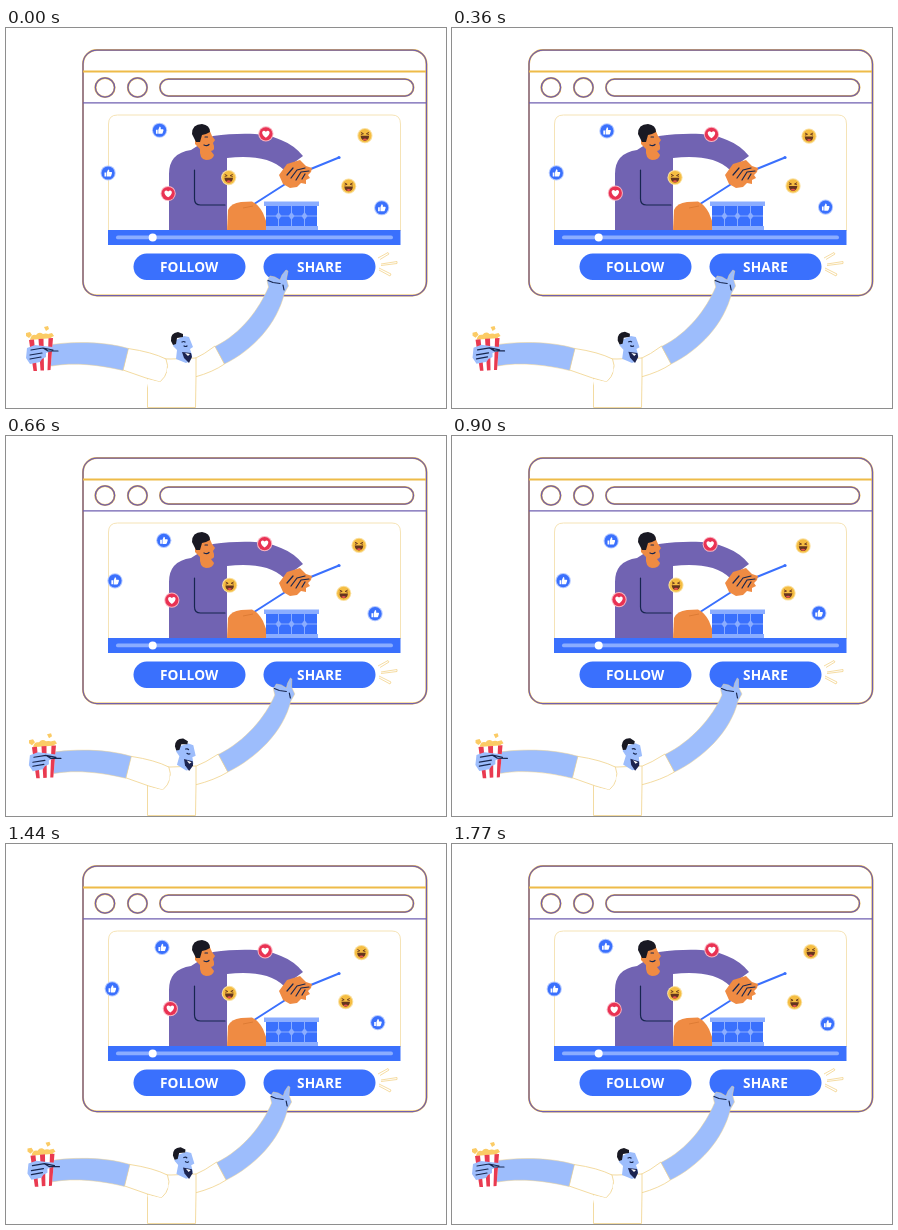
An HTML page that plays this animation: 440 px wide and 380 px high, repeating every 1800 ms.

```html
<!DOCTYPE html>
<html lang="en">
<head>
<meta charset="utf-8">
<title>Live video reactions</title>
<style>
  html, body { margin: 0; width: 100%; height: 100%; overflow: hidden; background: #fff; }
  svg { display: block; width: 440px; height: 380px; }
  text { font: 700 13.7px "Noto Sans", "Open Sans", sans-serif; fill: #fff; text-anchor: middle; letter-spacing: .15px; }
  .gold { fill: none; stroke: #eebb48; stroke-width: 2; }
  .violet { fill: none; stroke: #6f5fb0; stroke-width: 1.25; }
  .blue { fill: #3a70fd; }
  .pale { fill: #8badff; }
  .orange { fill: #ef8b43; }
  .purple { fill: #7163b2; }
  .skin { fill: #9dbdfc; stroke: #f2d58f; stroke-width: .5; }
  .cloth { fill: #fff; stroke: #f0d28a; stroke-width: .8; }
  .ink { fill: none; stroke: #17264f; stroke-width: 1.2; stroke-linecap: round; stroke-linejoin: round; }
  .dark { fill: #191923; }
  .corn { fill: #fbcb65; }
</style>
</head>
<body>
<svg viewBox="0 0 440 380">
  <defs>
    <g id="frame">
      <rect x="77" y="22" width="343.5" height="245.5" rx="14"/>
      <circle cx="99" cy="59.5" r="9.6"/>
      <circle cx="131.5" cy="59.5" r="9.6"/>
      <rect x="154" y="51" width="253.5" height="17" rx="8.5"/>
    </g>
    <g id="like">
      <circle r="7.6" fill="#b3c8ff"/><circle r="6.6" class="blue"/>
      <path d="M-3.6-.5h1.7v4h-1.7zM-1.3-.5 0-3.6q1.6-.2 1.2 2.6h2.2q.8.2.5 1.2L3 3q-.3.6-1 .6h-3.3z" fill="#fff"/>
    </g>
    <g id="heart">
      <circle r="7.6" fill="#f8b3c0"/><circle r="6.6" fill="#e93253"/>
      <path d="M0 3.8C-6.4-.3-3.2-5.2 0-2.1 3.2-5.2 6.4-.3 0 3.8z" fill="#fff"/>
    </g>
    <g id="laugh">
      <circle r="7.6" fill="#fae0a0"/><circle r="6.6" fill="#f5bd42"/>
      <path d="M-4.3.2H4.3Q3.8 5 0 5T-4.3.2z" fill="#65351f"/>
      <path d="M-2.4 3.8Q0 1.7 2.4 3.8 0 5.8-2.4 3.8z" fill="#e8524d"/>
      <path d="M-4-3.2l2.5 1.3-2.5.8M4-3.2 1.5-1.9 4-1.1" fill="none" stroke="#65351f" stroke-width=".9"/>
    </g>
  </defs>

  <use href="#frame" class="gold"/>
  <use href="#frame" class="violet"/>
  <path d="M77 43.5H420" class="gold"/>
  <path d="M77 74.8H420" class="violet"/>

  <path d="M102.5 203V96q0-9 9-9H386q8.500 0 8.500 9V203" fill="#fff" stroke="#f3dca4" stroke-width=".8"/>

  <!-- Drummer -->
  <path class="purple" d="M163 202V146Q163 125 185 122L207 108C232 105 258 104 275 112Q288 117 297 128L278 142C267 130 244 127 221 130V202z"/>
  <path class="ink" d="M188.500 142V171q0 6 6 6H219"/>
  <path class="orange" d="M189 108 203 101 206 108 209 112 207 115Q210 122 205 123L208 127Q207 132 200 132 193 131 194 121L189 116z"/>
  <path class="dark" d="M186 106Q186 96 196 96 204 97 204 104L200 106 196 107 194 114 190 114z"/>
  <path class="ink" d="M198 117q3 1.500 5-.5M199 109h2.500" stroke-width=".8"/>
  <path d="M245 178 284 153M290 147 333 129.500" fill="none" stroke="#3a70fd" stroke-width="2"/>
  <circle cx="333" cy="129.500" r="1.600" class="blue"/>
  <path class="orange" d="M273 147 281 136 294 132 300 138 306 140 305 144 302 147 304 150 300 152 300 156 295 155 291 159 284 160 277 156z"/>
  <path class="ink" d="M281 147 287 140M285 150 291 142 299 140M290 152 295 144 303 143M296 151 299 146"/>
  <path class="orange" d="M221 202 222 182Q225 175 235 174L246 173.500Q253 177 257 185L262 198V202z"/>
  <path d="M237 180 247 178" stroke="#d97832" stroke-width=".8"/>
  <path class="pale" d="M258 173.500h55v4.500h-55zM260 198h52v4h-52z"/>
  <path class="blue" d="M260 178h51v20h-51z"/>
  <path d="M260 188H311M272.500 178V198M285.500 178V198M298.500 178V198" fill="none" stroke="#8badff"/>
  <path class="pale" d="M272.500 184l3 4-3 4-3-4zM285.500 184l3 4-3 4-3-4zM298.500 184l3 4-3 4-3-4z"/>

  <!-- Player and buttons -->
  <path class="blue" d="M102 202H394.500V217H102z"/>
  <rect x="110" y="207.500" width="277" height="3.800" rx="1.900" class="pale"/>
  <circle cx="146.700" cy="209.400" r="4" fill="#fff"/>
  <rect x="127.500" y="225.500" width="112" height="26.500" rx="13.250" class="blue"/>
  <rect x="257.500" y="225.500" width="112" height="26.500" rx="13.250" class="blue"/>
  <text x="183.200" y="243.700">FOLLOW</text>
  <text x="313.500" y="243.700">SHARE</text>
  <path d="M372 230 382 224.500 383 226 374 231.500M375 236 391 233.500V235.500L375 237.500M373 240 385 246 384 248 373 242" fill="none" stroke="#f3d48c" stroke-width=".8"/>

  <g id="reactions"></g>

  <!-- Viewer -->
  <path id="sleeve" class="cloth"/>
  <path id="forearm" class="skin"/>
  <path id="wrist" class="ink"/>
  <path class="cloth" d="M141.500 379.500V335Q152 330 165 331L190 330V349L189.500 379.500z"/>
  <g id="head">
    <path fill="#9dbdfc" d="M168 313 178 308 183 309 185 314 187 319 184 321 186 327Q185 334 180 335L170 331 171 322 167 318z"/>
    <path class="dark" d="M165 313Q164 305 172 304L177 306 177 309 171 310 170 316 167 317z"/>
    <path d="M176 324 185 325 186 329 183 335 178 330z" fill="#1c2450"/>
    <path d="M179 325 184 326 182 328z" fill="#fff"/>
    <path class="ink" d="M176 314q2-1 3 0M178 318q2 1 3 0" stroke-width=".8"/>
  </g>
  <g id="snack">
    <path class="cloth" d="M122 320.500Q146 324 160 331 165 344 154 354L140 350 117 342z"/>
    <path d="M140 351 154 354Q162 350 161 341L165 336V360H142z" fill="#fff"/>
    <path class="skin" d="M37 318C62 313 98 313 122.500 320.500L117 342.500C94 337 68 334 46 338L30 336z"/>
    <path class="corn" d="M24 312Q25 306 30 307 33 303 37 306 43 304 46 311L36 315z"/>
    <path d="M23 312 47 310 44.500 342 27.500 343z" fill="#fff"/>
    <path d="M23 312 28 311.500 31 343 27.500 343zM32.500 311 37.500 310.700 38 342.400 34.500 342.600zM42.500 310.300 47 310 44.500 342 41.500 342.200z" fill="#e93a50"/>
    <path fill="#9dbdfc" d="M21 320 29 317 37 318 47 319 46 323 40 325 40 329 36 331 34 334 24 336 20 330z"/>
    <path class="ink" d="M25 322 37 320 47 322M24 327 36 325M37 320 42 323 52 323M24 331 35 329"/>
    <path class="corn" d="M20 305l4-1 2 3-3 3-3-2zM38 299l4-1 1 3-3 2zM42 306l4-1 2 3-4 2z"/>
  </g>
</svg>
<script>
const LOOP = 1800, STEP = 30, PEAK = 960;
const byId = id => document.getElementById(id);

// kind, start x, start y, travel x, travel y
const reactions = [
  ["like", 153.5, 102.2, 5.7, 2.8],
  ["like", 102, 145, 9.3, -.3],
  ["like", 375.8, 179.8, -9, -2.8],
  ["heart", 259.9, 105.8, -1.7, 2.5],
  ["heart", 162.1, 165.5, 5, -1.9],
  ["laugh", 222.7, 149.6, 1.3, -.5],
  ["laugh", 359, 107.6, -8, 2.4],
  ["laugh", 342.7, 158.2, -6.7, -1.2]
].map(([kind, x, y, dx, dy]) => {
  const node = document.createElementNS("http://www.w3.org/2000/svg", "use");
  node.setAttribute("href", "#" + kind);
  byId("reactions").append(node);
  return { node, x, y, dx, dy };
});

const move = (node, x, y, extra = "") =>
  node.setAttribute("transform", `translate(${x} ${y})${extra}`);

function drawArm(p) {
  const s = 4 * p, h = 7.5 * p;
  const at = (x, y, shift) => `${x + shift} ${y}`;
  byId("sleeve").setAttribute("d",
    `M186 332Q${at(199, 326, s / 2)} ${at(209, 318, s)}L${at(218.5, 336, s)}Q${at(207, 344, s / 2)} 189 349z`);
  byId("forearm").setAttribute("d",
    `M${at(209, 318.5, s)}C${at(236, 305, s)} ${at(253, 281, h)} ${at(262.5, 259, h)}` +
    `L${at(261, 253, h)} ${at(264, 248, h)} ${at(269, 249, h)} ${at(274, 252, h)} ` +
    `${at(276, 247, h * .9)} ${at(280, 242, h * .7)} ${at(282, 243, h * .6)} ${at(280.5, 251, h * .8)} ` +
    `${at(282.5, 258, h)} ${at(278.5, 265, h)}` +
    `C${at(271, 296, h)} ${at(247, 322, s)} ${at(218.5, 336, s)}z`);
  byId("wrist").setAttribute("d",
    `M${at(262, 252.5, h)}L${at(267, 254.5, h)} ${at(274, 255.5, h)}M${at(277, 257, h)}L${at(278, 262, h)}`);
}

function draw(ms) {
  const t = Math.floor(ms % LOOP / STEP) * STEP;
  const drift = (1 + Math.cos((t - PEAK) / LOOP * 2 * Math.PI)) / 2;
  const sway = drift * drift * (3 - 2 * drift);
  for (const r of reactions) move(r.node, r.x + r.dx * drift, r.y + r.dy * drift);
  move(byId("head"), 3.5 * sway, -sway, ` rotate(${11 * sway} 177 318)`);
  move(byId("snack"), 3.3 * sway, 0, ` rotate(${sway * .4} 150 342)`);
  drawArm(sway);
}

const start = performance.now();
function tick() {
  draw(performance.now() - start);
  requestAnimationFrame(tick);
}
tick();
</script>
</body>
</html>
```
